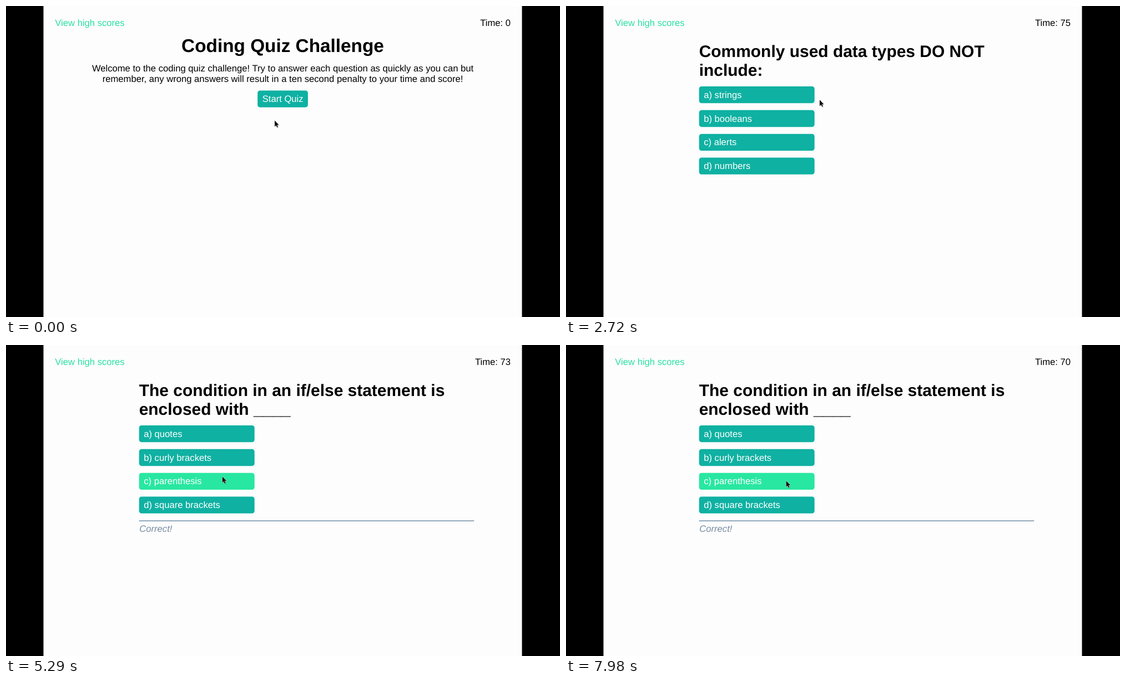
An HTML page for the animation above (8 s loop, 998x561 px).

```html
<!DOCTYPE html>
<html lang="en">
<head>
<meta charset="utf-8">
<title>Coding quiz</title>
<style>
  html, body { margin: 0; width: 100%; height: 100%; overflow: hidden; background: #000; }
  svg { display: block; }
  text { font: 16.64px "Liberation Sans", Arial, sans-serif; text-rendering: geometricPrecision; white-space: pre; }
  .link { fill: #2ae0a2; }
  .title { font-size: 33.35px; font-weight: bold; }
  .question { font-size: 29.95px; font-weight: bold; }
  .middle { text-anchor: middle; }
  .end { text-anchor: end; }
  .button rect { fill: #0fb1a2; }
  .button.hover rect { fill: #28e7a1; }
  .button text { fill: #fff; }
  .feedback text { fill: #778ca3; font-style: italic; }
  .feedback line { stroke: #708fa9; stroke-width: 1.6; }
</style>
</head>
<body>
<svg width="998" height="561" viewBox="0 0 998 561">
  <rect x="67.5" width="862" height="561" fill="#fdfdfd"/>
  <text class="link" x="88.3" y="36">View high scores</text>
  <text class="end" id="timer" x="909" y="36"></text>

  <g id="welcome">
    <text class="title middle" x="498.5" y="82.7">Coding Quiz Challenge</text>
    <text class="middle" x="498.5" y="118">Welcome to the coding quiz challenge! Try to answer each question as quickly as you can but</text>
    <text class="middle" x="498.5" y="136.8">remember, any wrong answers will result in a ten second penalty to your time and score!</text>
  </g>

  <g id="quiz">
    <text class="question" x="239.7" y="92"></text>
    <text class="question" x="239.7" y="126.4"></text>
    <g class="feedback" id="feedback">
      <line x1="239.7" x2="843.2" y1="317.2" y2="317.2"/>
      <text x="240.3" y="337">Correct!</text>
    </g>
  </g>
  <g id="buttons"></g>

  <g id="cursor">
    <path d="M.8 1.5V12.4L3.3 10.1 5.1 14.2 7.2 13.2 5.4 9.4H8.7Z" fill="#000" opacity=".18"/>
    <path d="M0 0V11L2.5 8.7 4.2 12.6 6 11.8 4.3 8H7.6Z" fill="#111" stroke="#fff" stroke-width=".9" stroke-linejoin="round" paint-order="stroke"/>
  </g>
</svg>
<script>
const LOOP = 8000, QUIZ_START = 1360, ANSWERED = 5000, FIRST_TICK = 3360;

const questions = [
  { lines: ["Commonly used data types DO NOT", "include:"],
    options: ["a) strings", "b) booleans", "c) alerts", "d) numbers"] },
  { lines: ["The condition in an if/else statement is", "enclosed with ____"],
    options: ["a) quotes", "b) curly brackets", "c) parenthesis", "d) square brackets"] }
];

// Pointer stops: time, x, y
const pointerPath = [
  [0, 484, 206.5], [600, 484, 206.5], [1150, 490.3, 175], [2350, 490.3, 175],
  [3250, 400, 159.5], [3610, 400, 159.5], [4350, 389.8, 216], [4440, 389.8, 216],
  [4840, 389.7, 237.3], [6500, 389.7, 237.3], [7400, 396.6, 245], [LOOP, 396.6, 245]
];

const byId = id => document.getElementById(id);
const show = (node, visible) => node.style.display = visible ? "" : "none";
const ease = p => p * p * (3 - 2 * p);

function svgNode(parent, tag, attributes) {
  const node = document.createElementNS("http://www.w3.org/2000/svg", tag);
  for (const name in attributes) node.setAttribute(name, attributes[name]);
  return parent.appendChild(node);
}

function makeButton(x, y, width, label = "") {
  const group = svgNode(byId("buttons"), "g", { class: "button" });
  svgNode(group, "rect", { x, y, width, height: 30.3, rx: 4.5 });
  const text = svgNode(group, "text", { x: x + 8.5, y: y + 20.8 });
  text.textContent = label;
  return { group, text, x, y, width };
}

const startButton = makeButton(453.2, 152.5, 90.7, "Start Quiz");
const optionButtons = [0, 1, 2, 3].map(i => makeButton(239.7, 145 + i * 42.83, 208));
const questionLines = document.querySelectorAll(".question");

function pointerAt(t) {
  const i = pointerPath.findIndex(stop => stop[0] > t);
  const [t0, x0, y0] = pointerPath[i - 1], [t1, x1, y1] = pointerPath[i];
  const p = ease((t - t0) / (t1 - t0));
  return [x0 + (x1 - x0) * p, y0 + (y1 - y0) * p];
}

function timeLeft(t) {
  if (t < QUIZ_START) return 0;
  return 75 - Math.max(0, Math.floor((t - FIRST_TICK) / 1000) + 1);
}

function render(t) {
  const started = t >= QUIZ_START;
  const question = questions[t < ANSWERED ? 0 : 1];
  const [px, py] = pointerAt(t);

  byId("timer").textContent = "Time: " + timeLeft(t);
  show(byId("welcome"), !started);
  show(byId("quiz"), started);
  show(byId("feedback"), t >= ANSWERED);
  show(startButton.group, !started);
  questionLines.forEach((line, i) => line.textContent = question.lines[i]);
  optionButtons.forEach((button, i) => {
    show(button.group, started);
    button.text.textContent = question.options[i];
  });
  for (const { group, x, y, width } of [startButton, ...optionButtons]) {
    const inside = px >= x && px <= x + width && py >= y && py <= y + 30.3;
    group.classList.toggle("hover", inside);
  }
  byId("cursor").setAttribute("transform", `translate(${px} ${py})`);
}

const begin = performance.now();
function frame() {
  render((performance.now() - begin) % LOOP);
  requestAnimationFrame(frame);
}
frame();
</script>
</body>
</html>
```
